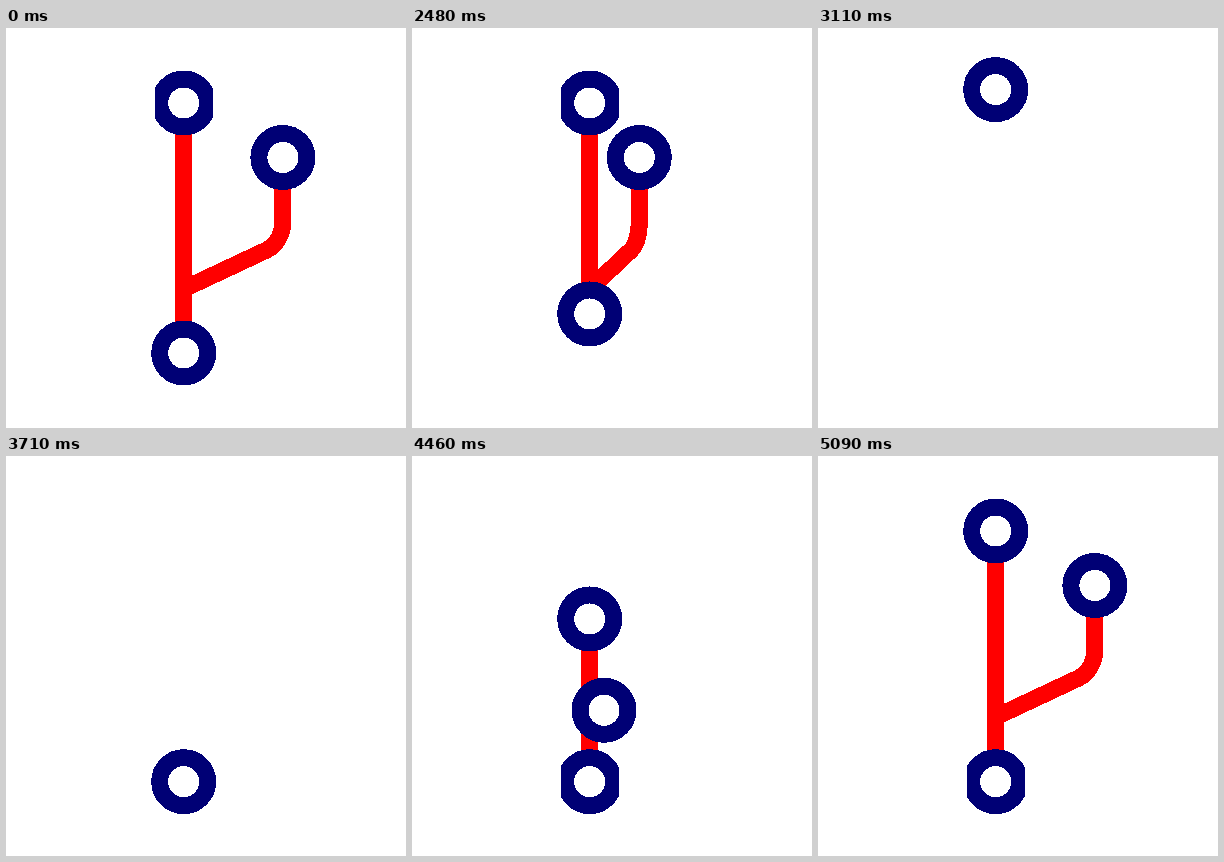
An HTML page that plays this animation: 400x400 px, repeating every 5.12 s.

```html
<!DOCTYPE html>
<html>
<head>
<meta charset="utf-8">
<style>
html, body { margin: 0; width: 100%; height: 100%; overflow: hidden; background: #fff; }
svg { display: block; width: 400px; height: 400px; shape-rendering: crispEdges; }
path { fill: none; stroke: #f00; stroke-width: 17; }
circle { fill: #fff; stroke: #000075; stroke-width: 17; }
</style>
</head>
<body>
<svg viewBox="0 0 400 400">
  <clipPath id="sides"><rect x="149" y="0" width="58" height="400"/></clipPath>
  <path id="trunk"/>
  <path id="branch"/>
  <circle id="side" r="24"/>
  <g clip-path="url(#sides)"><circle id="anchor" r="24"/></g>
  <circle id="mover" r="24"/>
</svg>
<script>
const LOOP = 5120, HOLD = 2030, STEP = 30;
const X = 177.7, TOP = 75, BOTTOM = 325, LAND = 325.7, PEAK = 56.5;
const [trunk, branch, side, anchor, mover] =
  ['trunk', 'branch', 'side', 'anchor', 'mover'].map(id => document.getElementById(id));

const mix = (a, b, k) => a + (b - a) * k;

// Cubic bezier easing (.75, 0, .25, 1), solved by bisection
function ease(t, start, duration) {
  const x = Math.min(1, Math.max(0, (t - start) / duration));
  let lo = 0, hi = 1;
  for (let i = 0; i < 24; i++) {
    const s = (lo + hi) / 2, r = 1 - s;
    if (2.25 * s * r * r + 0.75 * s * s * r + s * s * s < x) lo = s; else hi = s;
  }
  return lo * lo * (3 - 2 * lo);
}

function show(el, on) {
  el.style.display = on ? '' : 'none';
}

function place(el, x, y) {
  el.setAttribute('cx', x);
  el.setAttribute('cy', y);
}

// Branch squeezed sideways by `width` and kept above `floor`
function shapeBranch(width, floor) {
  const p = (dx, y) => `${X + dx * width},${Math.min(y, floor)}`;
  branch.setAttribute('d',
    `M${p(0, 261)} L${p(83, 222)} C${p(93, 217)} ${p(99.2, 206)} ${p(99.2, 193)} L${p(99.2, 129.5)}`);
}

function draw(t) {
  const collapsing = t < 3320, growing = t >= 3744;
  let y, fixed, hasSide, hasAnchor;
  branch.style.strokeDasharray = 'none';

  if (collapsing) {
    y = mix(BOTTOM, PEAK, ease(t, 2010, 1310));
    fixed = TOP;
    hasAnchor = hasSide = y > TOP;
    const width = 1 - ease(t, HOLD, 900);
    shapeBranch(width, y);
    place(side, X + 99.2 * width, Math.min(129.5, y));
  } else if (!growing) {
    y = mix(PEAK, LAND, ease(t, 3320, 390));
    fixed = LAND;
    hasAnchor = hasSide = false;
  } else {
    y = mix(LAND, TOP, ease(t, 3744, 1325));
    fixed = LAND;
    hasAnchor = true;
    hasSide = t > 4283;
    shapeBranch(1, BOTTOM);
    const total = branch.getTotalLength();
    const length = total * ease(t, 4283, 600);
    const tip = branch.getPointAtLength(length);
    branch.style.strokeDasharray = `${length} ${total + 10}`;
    place(side, tip.x, tip.y);
  }

  place(anchor, X, fixed);
  place(mover, X, y);
  trunk.setAttribute('d', `M${X},${fixed} V${y}`);
  show(trunk, hasAnchor);
  show(anchor, hasAnchor);
  show(branch, hasSide);
  show(side, hasSide);
}

function frame() {
  const t = performance.now() % LOOP;
  draw(t < HOLD ? 0 : HOLD + Math.floor((t - HOLD) / STEP) * STEP);
  requestAnimationFrame(frame);
}
frame();
</script>
</body>
</html>
```
